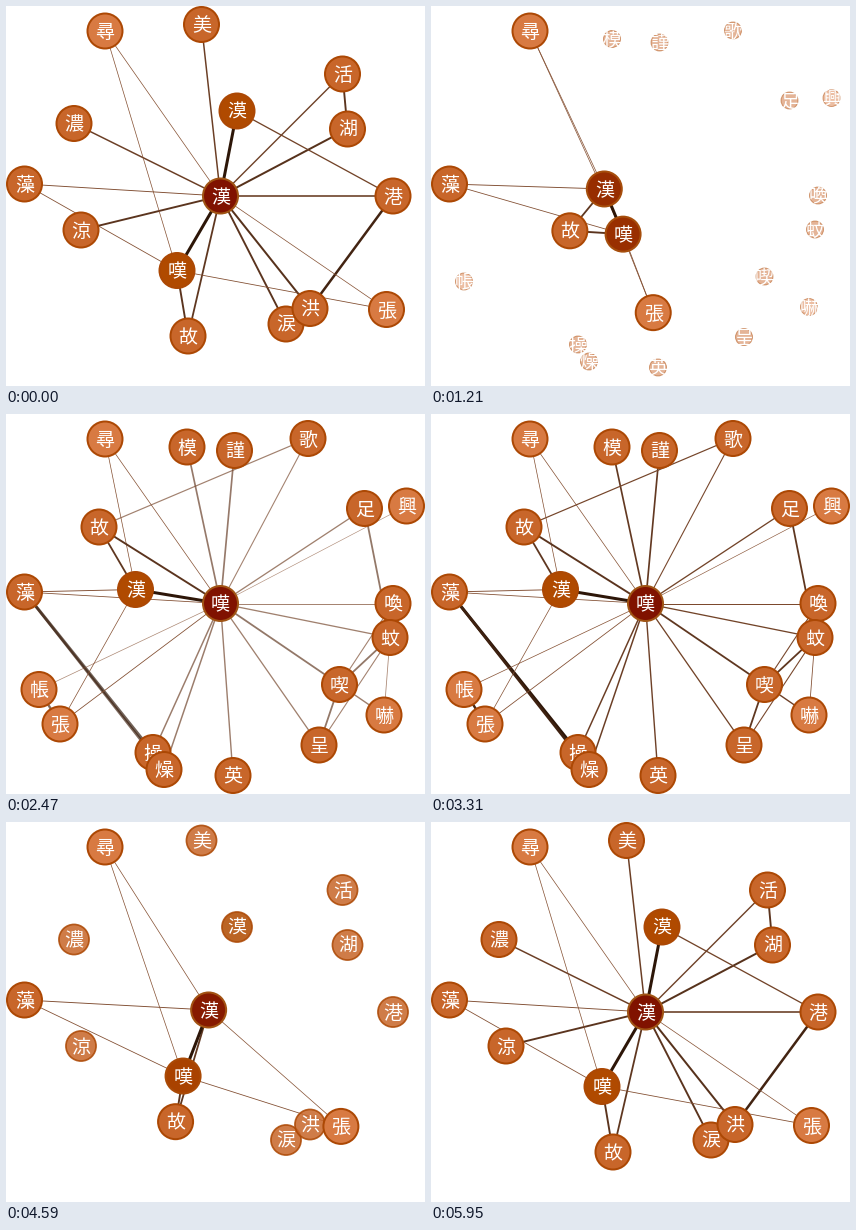
These frames come from a looping animation (419x380 px, 6020 ms). A matplotlib script:

```python
import numpy as np
import matplotlib.pyplot as plt
from matplotlib.animation import FuncAnimation
from matplotlib.patches import Circle

W, H, DPI = 419, 380, 100
PX = 72 / DPI
LOOP, STEP = 6020, 20
FRAMES = LOOP // STEP
R = 17.5
MOVE, FADE = 1750, 875

RGB = {
    "core": (128, 18, 0),
    "near": (176, 74, 0),
    "mid": (200, 102, 42),
    "far": (216, 122, 66),
}
RIM, CORE_RIM = (172, 72, 4), (160, 84, 20)

# kanji: first position, second position, first shade, second shade
SHARED = {
    "尋": ((99, 25), (99, 25), "far", "far"),
    "藻": ((18.5, 178), (18.5, 178), "mid", "mid"),
    "故": ((182, 330), (93, 113), "mid", "mid"),
    "張": ((380.5, 303.5), (54, 310), "far", "far"),
    "嘆": ((171, 264.5), (214.5, 189.5), "near", "core"),
    "漢": ((214.5, 190), (129.5, 175.5), "core", "near"),
}
FIRST = {
    "美": (195.5, 18.5), "活": (336.5, 68), "湖": (341.5, 123),
    "漠": (231, 105), "濃": (68, 117.5), "涼": (75, 224),
    "港": (387, 190), "涙": (280, 318), "洪": (304, 302.5),
}
SECOND = {
    "模": (181, 33), "謹": (228.5, 36.5), "歌": (302, 24.5),
    "足": (358.5, 94.5), "興": (400.5, 92), "喚": (387, 189.5),
    "蚊": (384, 223.5), "喫": (333.5, 270.5), "嚇": (378, 301),
    "呈": (313, 331), "英": (227, 361.5), "操": (147, 338.5),
    "燥": (158, 355.5), "帳": (33, 275.5),
}
SHADE = {"漠": "near", "興": "far", "帳": "far", "嚇": "far"}

SHARED_LINKS = [
    ("漢尋", .7), ("嘆尋", .7), ("漢藻", .9), ("嘆藻", .8), ("漢故", 1.8),
    ("嘆故", 1.9), ("漢張", .7), ("嘆張", .8), ("漢嘆", 3),
]
FIRST_LINKS = [
    ("漢美", 1.5), ("漢漠", 3), ("漢活", 1.4), ("漢湖", 2), ("漢港", 1.6),
    ("漠港", 1.3), ("活湖", 1.9), ("漢濃", 1.5), ("漢涼", 1.9),
    ("漢涙", 1.9), ("漢洪", 2), ("港洪", 2.5),
]
SECOND_LINKS = [
    ("嘆模", 1.7), ("嘆謹", 1.7), ("嘆歌", 1.1), ("故歌", 1.2), ("嘆足", 1.3),
    ("嘆興", .6), ("嘆喚", 1), ("嘆蚊", 1.3), ("嘆喫", 1.8), ("喫嚇", 1.4),
    ("嘆呈", 1.3), ("喫呈", 1.8), ("喫蚊", 1.8), ("喫喚", 1.1), ("呈蚊", 1.1),
    ("足蚊", 1.8), ("蚊嚇", .8), ("嘆英", 1.4), ("嘆操", 1.5), ("嘆燥", 1.5),
    ("藻操", 3), ("藻燥", 2.6), ("帳張", 2.4), ("嘆帳", .7),
]


def mix(a, b, k):
    return np.asarray(a, float) * (1 - k) + np.asarray(b, float) * k


def tint(a, b=None, k=0):
    return tuple(mix(a, a if b is None else b, k) / 255)


def ease(x):
    """Cubic in and out."""
    x = min(max(x, 0), 1)
    return 4 * x**3 if x < .5 else 1 - 4 * (1 - x)**3


def phases(t):
    """Return (leaving, entering, linking, forward) for a time in the loop."""
    forward = t < 3000
    if forward:
        u = np.interp(t, [510, 1090, 1140, 1200, 1760, 2780],
                      [0, 480, 806, 866, 1416, MOVE + FADE])
    else:
        u = np.interp(t, [3300, 3820, 4580, 5950],
                      [0, 427, 1178, MOVE + FADE])
    return 1 - ease(u / FADE), ease(u / MOVE), ease((u - MOVE) / FADE), forward


fig = plt.figure(figsize=(W / DPI, H / DPI), dpi=DPI, facecolor="white")
ax = fig.add_axes([0, 0, 1, 1])
ax.set(xlim=(0, W), ylim=(H, 0))
ax.axis("off")


class Node:
    count = 0

    def __init__(self, char, pos, shade):
        z = 10 + Node.count
        Node.count += 1
        self.disc = ax.add_patch(Circle(pos, R, zorder=z))
        self.label = ax.text(0, 0, char, color="white", ha="center",
                             va="baseline", fontsize=19 * PX, zorder=z + .5,
                             family="Noto Sans CJK JP", weight="light")
        self.paint(tint(RGB[shade]), tint(RIM))
        self.place(pos)

    def paint(self, fill, rim):
        self.disc.set_facecolor(fill)
        self.disc.set_edgecolor(rim)

    def place(self, pos):
        self.disc.center = pos
        self.label.set_position((pos[0], pos[1] + 7))

    def show(self, size, alpha):
        # The label stays solid white, so it reads as cut out of the disc.
        for art in (self.disc, self.label):
            art.set_visible(alpha > .004)
        self.disc.set_alpha(alpha)
        self.disc.set_radius(R * size)
        self.disc.set_linewidth(2 * size * PX)


def link(pair, width, spots):
    a, b = (spots[c] for c in pair)
    depth = min((width - .6) / 2.4, 1) ** 1.2
    shade = tint((134, 80, 50), (45, 22, 8), depth)
    return ax.plot([a[0], b[0]], [a[1], b[1]], color=shade, lw=width * PX,
                   solid_capstyle="butt", zorder=1)[0]


def fade(lines, alpha):
    for line in lines:
        line.set_visible(alpha > .004)
        line.set_alpha(alpha)


def cluster(spots, links, side):
    """Build the nodes and links that belong to one layout only."""
    everyone = {**spots, **{c: v[side] for c, v in SHARED.items()}}
    lines = [link(pair, w, everyone) for pair, w in links]
    nodes = [Node(c, p, SHADE.get(c, "mid")) for c, p in spots.items()]
    return nodes, lines


groups = [cluster(FIRST, FIRST_LINKS, 0), cluster(SECOND, SECOND_LINKS, 1)]
home = {c: v[0] for c, v in SHARED.items()}
bonds = [(pair, link(pair, w, home)) for pair, w in SHARED_LINKS]
movers = {c: Node(c, v[0], v[2]) for c, v in SHARED.items()}
for mover in movers.values():
    mover.show(1, 1)


def rim_of(shade):
    return CORE_RIM if shade == "core" else RIM


def draw(i):
    leaving, entering, linking, forward = phases(i * STEP)
    old, new = groups if forward else groups[::-1]
    for node in old[0]:
        node.show(1, leaving)
    for node in new[0]:
        node.show(entering, entering)
    fade(old[1], leaving)
    fade(new[1], linking)

    k = entering if forward else 1 - entering
    spots = {}
    for c, (a, b, s0, s1) in SHARED.items():
        spots[c] = mix(a, b, k)
        movers[c].place(spots[c])
        movers[c].paint(tint(RGB[s0], RGB[s1], k),
                        tint(rim_of(s0), rim_of(s1), k))
    for (a, b), line in bonds:
        line.set_data(*zip(spots[a], spots[b]))
    return []


anim = FuncAnimation(fig, draw, frames=FRAMES, interval=STEP,
                     repeat=True, repeat_delay=0, blit=False)
plt.show()
```
